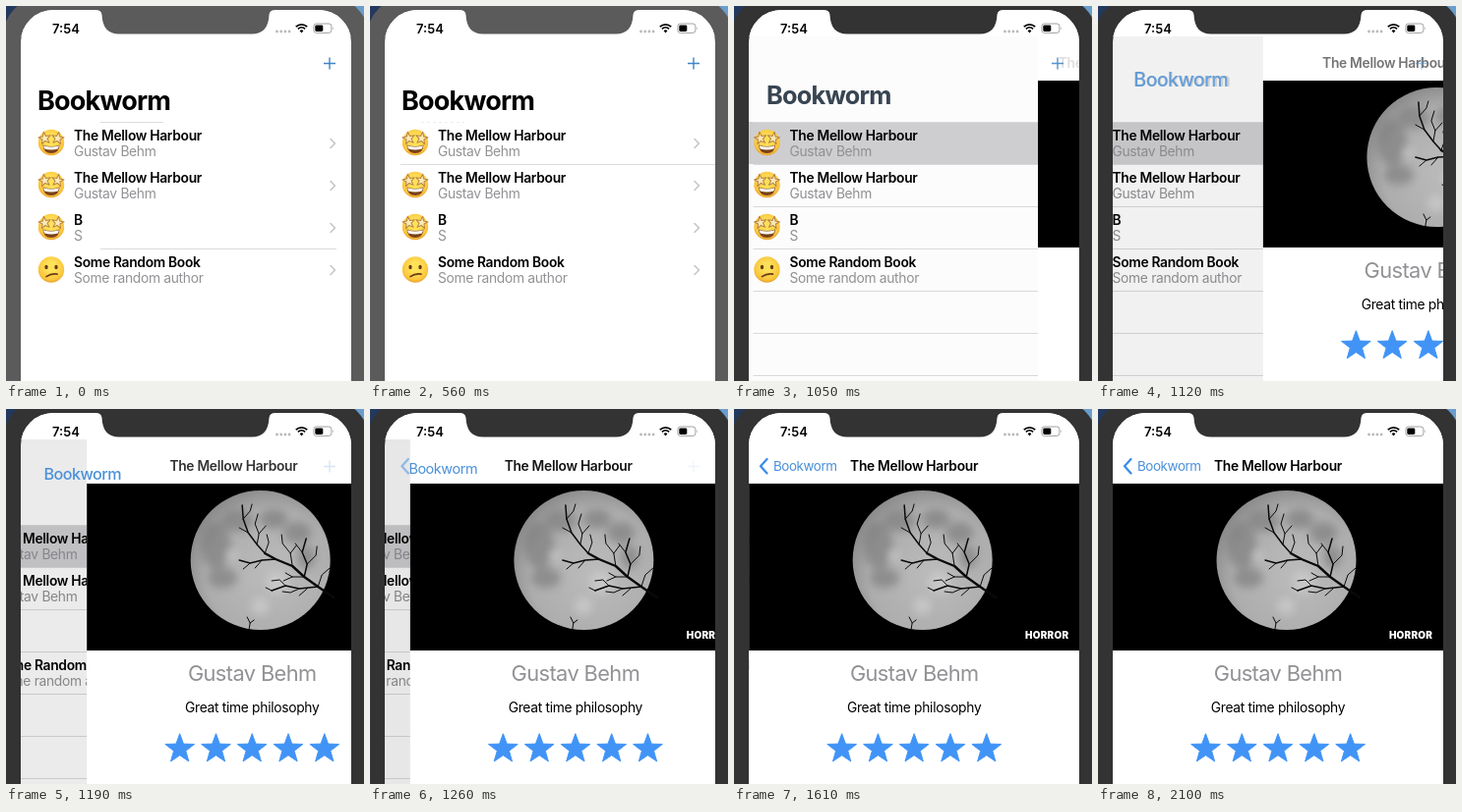
These frames come from a looping animation (364 px wide and 382 px high, 2.17 s). An HTML page:

```html
<!DOCTYPE html>
<html lang="en">
<head>
<meta charset="utf-8">
<title>Book list</title>
<style>
/* --p: progress of the push from list (0) to detail page (1) */
@property --p { syntax: '<number>'; inherits: true; initial-value: 0; }

html, body { margin: 0; width: 100%; height: 100%; overflow: hidden; background: #22385c; }
svg { display: block; }
#stage { width: 364px; height: 382px; animation: push 2170ms step-end infinite; }

text { font: 400 13.8px Inter, Roboto, sans-serif; letter-spacing: -.3px; white-space: pre; }
.bold { font-weight: 600; }
.grey { fill: #929296; }
.mid { text-anchor: middle; }
.author { font-size: 21.8px; letter-spacing: -.6px; }
.genre { font-size: 10px; font-weight: 900; letter-spacing: .2px; fill: #fff; }
.clock { font-size: 13px; font-weight: 600; letter-spacing: 0; }
.chevron { fill: none; stroke: #c4c4c7; stroke-width: 1.5; stroke-linecap: round; stroke-linejoin: round; }
.rule { stroke: #dcdcde; stroke-width: 1; }
.blue { fill: #4194f6; }

.bezel { fill: #5b5b5b; animation: focus 2170ms step-end infinite; }
.first { animation: first 2170ms step-end infinite; }
.idle { opacity: 0; animation: idle 2170ms step-end infinite; }
.pressed { opacity: 0; animation: pressed 2170ms step-end infinite; }

#list { transform: translateX(calc(-100px * var(--p))); }
#dim { opacity: calc(.1 * var(--p)); }
#page { transform: translateX(calc(336px * (1 - var(--p)))); }
#title { opacity: var(--p); transform: translateX(calc(242px * (1 - var(--p)))); }
#plus { opacity: calc(1 - var(--p)); }
#back { opacity: calc((var(--p) - .85) * 7); transform: translateX(calc(70px * (1 - var(--p)))); }
.name {
  font-size: calc(27px - 13.6px * var(--p));
  letter-spacing: -.03em;
  transform: translate(calc(32px + 8px * var(--p)), calc(105.5px - 42.5px * var(--p)));
}
.large { font-weight: 700; opacity: calc(1 - 1.6 * var(--p)); }
.small { font-weight: calc(700 - 300 * var(--p)); fill: #4a90d9; opacity: calc(1.5 * var(--p)); }

@keyframes push {
  0% { --p: 0; }
  48.38% { --p: .125; }
  51.61% { --p: .545; }
  54.83% { --p: .8; }
  58.06% { --p: .923; }
  61.29% { --p: .97; }
  64.51% { --p: .9896; }
  67.74% { --p: .9962; }
  70.96% { --p: .9987; }
  74.19% { --p: .9995; }
  77.41%, 100% { --p: 1; }
}
@keyframes focus { 0% { fill: #5b5b5b; } 38.7%, 100% { fill: #333; } }
@keyframes first { 0% { opacity: 1; } 3.22%, 100% { opacity: 0; } }
@keyframes idle { 0% { opacity: 0; } 3.22% { opacity: 1; } 48.38%, 100% { opacity: 0; } }
@keyframes pressed { 0% { opacity: 0; } 48.38%, 100% { opacity: 1; } }
</style>
</head>
<body>
<svg id="stage" viewBox="0 0 364 382">
  <defs>
    <clipPath id="screen"><rect x="15" y="4" width="336" height="420" rx="33"/></clipPath>
    <clipPath id="disc"><circle cx="191.5" cy="154" r="71"/></clipPath>
    <linearGradient id="desk">
      <stop offset=".1" stop-color="#22385c"/><stop offset="1" stop-color="#6a9fcd"/>
    </linearGradient>
    <radialGradient id="skin" cx=".5" cy=".4" r=".62">
      <stop offset=".3" stop-color="#ffe25a"/><stop offset=".8" stop-color="#fbc53c"/><stop offset="1" stop-color="#e59a2c"/>
    </radialGradient>
    <radialGradient id="lunar" cx=".58" cy=".6" r=".62">
      <stop offset="0" stop-color="#bcbcbc"/><stop offset=".75" stop-color="#adadad"/><stop offset="1" stop-color="#8c8c8c"/>
    </radialGradient>
    <filter id="soft"><feGaussianBlur stdDeviation="4"/></filter>

    <path id="star" stroke-linejoin="round" d="M0-15.6 3.76-5.18 14.84-4.82 6.09 1.98 9.17 12.62 0 6.4-9.17 12.62-6.09 1.98-14.84-4.82-3.76-5.18Z"/>
    <path id="arrow" class="chevron" d="M330 135.5l4.5 4.5-4.5 4.5"/>

    <g id="starry">
      <circle r="13.2" fill="url(#skin)"/>
      <path d="M-8.5 2.5Q0 5.5 8.5 2.5 8 11 0 11T-8.5 2.5Z" fill="#7b4218"/>
      <path d="M-7.8 3.2Q0 5.8 7.8 3.2 7.6 5.8 6.8 6.6 0 8.4-6.8 6.6-7.6 5.8-7.8 3.2Z" fill="#fff"/>
      <g fill="#fbe9b8" stroke="#b8813c" stroke-width="2.4">
        <use href="#star" transform="translate(-6.6 -4.2) rotate(-10) scale(.42)"/>
        <use href="#star" transform="translate(6.6 -4.2) rotate(10) scale(.42)"/>
      </g>
    </g>
    <g id="unsure">
      <circle r="13.2" fill="url(#skin)"/>
      <ellipse cx="-5" cy="-2.5" rx="1.7" ry="2.3" fill="#6b3d14"/>
      <ellipse cx="5" cy="-2.5" rx="1.7" ry="2.3" fill="#6b3d14"/>
      <path d="M-5 7.2Q0 3.6 6 4.6" fill="none" stroke="#6b3d14" stroke-width="1.6" stroke-linecap="round"/>
    </g>
  </defs>

  <rect width="364" height="382" fill="url(#desk)"/>
  <rect class="bezel" x="-3" y="-9" width="372" height="460" rx="40"/>

  <g clip-path="url(#screen)">
    <rect x="15" y="4" width="336" height="378" fill="#fff"/>

    <g id="list">
      <rect class="pressed" x="15" y="118" width="440" height="43" fill="#d1d1d4"/>
      <path class="rule pressed" d="M32 118.5H460M32 161.5H460M32 204.5H460M32 247.5H460M32 290.5H460M32 333.5H460M32 376.5H460"/>
      <path class="rule first" opacity=".8" d="M96 118.5H160M96 247.5H336"/>
      <g class="idle">
        <path class="rule" d="M31 161.5H351"/>
        <path class="rule" d="M52 118.5H96" stroke-dasharray="3 3" opacity=".5"/>
      </g>
      <g>
        <use href="#starry" x="46" y="139"/>
        <text class="bold" x="69" y="137">The Mellow Harbour</text>
        <text class="grey" x="69" y="153">Gustav Behm</text>
        <use href="#arrow"/>
      </g>
      <g transform="translate(0 43)">
        <use href="#starry" x="46" y="139"/>
        <text class="bold" x="69" y="137">The Mellow Harbour</text>
        <text class="grey" x="69" y="153">Gustav Behm</text>
        <use href="#arrow"/>
      </g>
      <g transform="translate(0 86)">
        <use href="#starry" x="46" y="139"/>
        <text class="bold" x="69" y="137">B</text>
        <text class="grey" x="69" y="153">S</text>
        <use href="#arrow"/>
      </g>
      <g transform="translate(0 129)">
        <use href="#unsure" x="46" y="139.5"/>
        <text class="bold" x="69" y="137">Some Random Book</text>
        <text class="grey" x="69" y="153">Some random author</text>
        <use href="#arrow"/>
      </g>
    </g>
    <rect id="dim" x="15" y="31" width="336" height="351"/>

    <g id="page">
      <rect x="15" y="31" width="336" height="351" fill="#fff"/>
      <rect x="15" y="76" width="336" height="170"/>
      <circle cx="191.5" cy="154" r="71" fill="url(#lunar)"/>
      <g clip-path="url(#disc)">
        <g fill="#777" opacity=".6" filter="url(#soft)">
          <ellipse cx="146" cy="139" rx="15" ry="24"/>
          <ellipse cx="168" cy="114" rx="16" ry="11"/>
          <ellipse cx="205" cy="112" rx="14" ry="10"/>
          <ellipse cx="229" cy="126" rx="14" ry="11"/>
          <ellipse cx="153" cy="172" rx="15" ry="10"/>
          <ellipse cx="238" cy="151" rx="9" ry="12"/>
        </g>
        <g fill="#d2d2d2" opacity=".6" filter="url(#soft)">
          <circle cx="191" cy="201" r="9"/>
          <circle cx="162" cy="149" r="6"/>
          <circle cx="209" cy="177" r="11"/>
        </g>
      </g>
      <g fill="none" stroke="#090909" stroke-linecap="round" stroke-linejoin="round">
        <path stroke-width="2.4" d="M266 192 250 181 236 171 224 160 207 153 196 147"/>
        <path stroke-width="1.5" d="M196 147 188 138 179 126 174 112 173 98M207 153 193 154 181 157 170 154M236 171 239 158 234 146 238 132M250 181 231 183 217 180 203 185"/>
        <path stroke-width="1" d="M188 138 190 127 186 117 189 107M179 126 170 121M174 112 181 104 183 97M190 127 197 119M196 147 200 136 198 128M224 160 222 147 214 137 213 128M222 147 228 139M239 158 248 149 249 140M234 146 227 137M181 157 174 163M193 154 186 162M231 183 222 187 214 186M217 180 211 174 203 175M236 171 224 171 217 167M250 181 254 169 262 162M224 171 215 175M239 183 231 190M203 185 197 182M178 212 181 218 180 224M181 218 185 215"/>
      </g>
      <text class="genre mid" x="318" y="234">HORROR</text>
      <text class="author grey mid" x="183" y="277">Gustav Behm</text>
      <text class="mid" x="183" y="308.5">Great time philosophy</text>
      <g class="blue" stroke="#4194f6">
        <use href="#star" x="109.5" y="346.3"/>
        <use href="#star" x="146.3" y="346.3"/>
        <use href="#star" x="183" y="346.3"/>
        <use href="#star" x="219.8" y="346.3"/>
        <use href="#star" x="256.6" y="346.3"/>
      </g>
    </g>

    <text class="name large">Bookworm</text>
    <text class="name small">Bookworm</text>
    <path id="back" d="M33.5 51 27 58.2 33.5 65.5" fill="none" stroke="#3d8ee6" stroke-width="2.3" stroke-linecap="round" stroke-linejoin="round"/>
    <text id="title" class="bold mid" x="183" y="63">The Mellow Harbour</text>
    <path id="plus" d="M323 58.5H335M329 52.5V64.5" stroke="#3f84c4" stroke-width="1.4"/>

    <rect x="15" y="4" width="336" height="27" fill="#fff"/>
    <text class="clock" x="47" y="27.5">7:54</text>
    <g fill="#b9b9bb">
      <circle cx="275.5" cy="26" r="1.4"/><circle cx="279.7" cy="26" r="1.4"/>
      <circle cx="283.9" cy="26" r="1.4"/><circle cx="288.1" cy="26" r="1.4"/>
    </g>
    <path d="M294.8 21.2A8.2 8.2 0 0 1 306.2 21.2M296.9 23.4A5.2 5.2 0 0 1 304.1 23.4" fill="none" stroke="#000" stroke-width="1.8"/>
    <path d="M298.6 25.2A2.8 2.8 0 0 1 302.4 25.2L300.5 27.4Z"/>
    <rect x="312.9" y="18" width="18" height="9.4" rx="2.6" fill="none" stroke="#a0a0a0"/>
    <rect x="314.3" y="19.4" width="8" height="6.6" rx="1.4"/>
    <path d="M332.3 21.2Q334 22.7 332.3 24.2Z" fill="#a0a0a0"/>
  </g>

  <path class="bezel" d="M91 4Q97 4 97.5 9C98 22 104 28.5 115 28.5H250C261 28.5 267 22 267.5 9Q268 4 274 4V2H91Z"/>
</svg>
</body>
</html>
```
